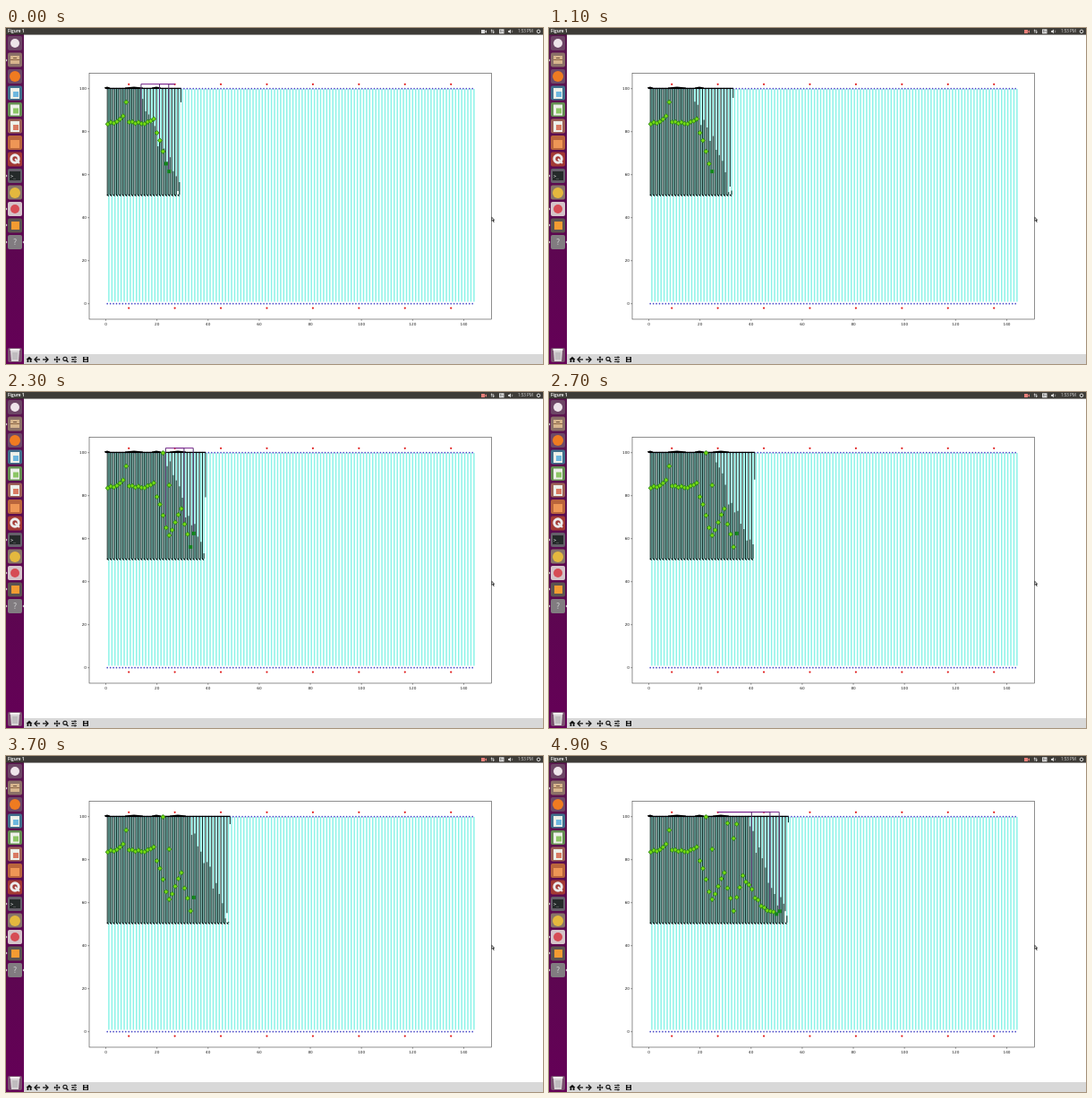
Animation, 600 px wide and 375 px high, one loop 5 s. Source, as an HTML page with a canvas:

```html
<!DOCTYPE html>
<html lang="en">
<head>
<meta charset="utf-8">
<title>Figure 1</title>
<style>
html, body { margin: 0; width: 100%; height: 100%; overflow: hidden; background: #fff; }
canvas { display: block; }
</style>
</head>
<body>
<canvas id="stage" width="600" height="375"></canvas>
<script>
const c = document.getElementById('stage').getContext('2d');
const LOOP = 5000, ROWS = 120, TOP = 68, MID = 187, BASE = 307.7, DEPOT = 62.6;
const px = v => 111.5 + v * 2.857, py = v => BASE - v * 2.4;
const rowX = k => px(.6 + 1.2 * k);
const clamp = v => Math.max(0, Math.min(1, v));
const mix = (a, b, u) => a + (b - a) * u;
const noise = k => {
  const s = Math.sin(k * 12.9898 + 4.1) * 43758.5453;
  return (s - Math.floor(s)) * 2 - 1;
};

// Straight runs between a few [position, value] points.
function ramp(points, at) {
  let i = 0;
  while (i < points.length - 2 && at >= points[i + 1][0]) i++;
  const [a, b] = [points[i], points[i + 1]];
  return mix(a[1], b[1], clamp((at - a[0]) / (b[0] - a[0])));
}

// How many rows are traced, and how many are picked, at time t.
const traced = t => ramp([[0, 24.15], [1100, 27.1], [3100, 36.1], [4200, 43.4], [5000, 45.3]], t);
const picked = t => ramp([[0, 20], [300, 20.9], [1300, 20.9], [2400, 28.9], [3900, 28.9], [5000, 43.5]], t);

// Height of the pick in row k.
const pickY = k => noise(k) * 3 + ramp([[0, 108], [5, 99], [6, 85], [7, 102], [11, 108], [15, 103],
  [20, 163], [24, 131], [27, 172], [30, 134], [36, 168], [42, 175]], k);

// Late picks higher up: row, height, time.
const extras = [[18, 68, 1500], [20, 104, 2000], [25, 75, 3800], [27, 92, 4000], [28, 76, 3900]];

function rect(x, y, w, h, color) {
  c.fillStyle = color;
  c.fillRect(x, y, w, h);
}
function line(color, width, ...pts) {
  c.strokeStyle = color;
  c.lineWidth = width;
  c.beginPath();
  for (let i = 0; i < pts.length; i += 2) c.lineTo(pts[i], pts[i + 1]);
  c.stroke();
}
function poly(color, ...pts) {
  c.fillStyle = color;
  c.beginPath();
  for (let i = 0; i < pts.length; i += 2) c.lineTo(pts[i], pts[i + 1]);
  c.fill();
}
function diamond(x, y, r, color) {
  poly(color, x - r, y, x, y - r, x + r, y, x, y + r);
}
function dot(x, y, r, color) {
  c.fillStyle = color;
  c.beginPath();
  c.arc(x, y, r, 0, 7);
  c.fill();
}
function ring(x, y, r, color, width) {
  c.strokeStyle = color;
  c.lineWidth = width;
  c.beginPath();
  c.arc(x, y, r, 0, 7);
  c.stroke();
}
function text(s, x, y, font, color, align = 'left') {
  c.font = font;
  c.fillStyle = color;
  c.textAlign = align;
  c.fillText(s, x, y);
}
function tile(y, color) {
  c.fillStyle = color;
  c.beginPath();
  c.roundRect(2, y - 8, 16, 16, 2);
  c.fill();
}

function drawSidebar() {
  const g = c.createLinearGradient(0, 7, 0, 375);
  g.addColorStop(0, '#5b1750');
  g.addColorStop(.6, '#5c0750');
  g.addColorStop(1, '#650057');
  rect(0, 7, 20, 368, g);
  const tiles = ['#6d4666', '#8b7168', '#6d4a68', '#41718d', '#648f52', '#9d6257', '#b9653c',
    '#a33a35', '#65606a', '#87756a', '#d4c4c9', '#5c5551', '#817c80'];
  tiles.forEach((color, i) => tile(17 + i * 18.5, color));
  dot(10, 17, 5, '#eee4ea');
  rect(5, 31, 10, 9, '#d7b58d');
  rect(5, 35, 10, 1, '#8c6545');
  rect(8, 33, 4, 1, '#72533d');
  dot(10, 54, 6, '#ef7b21');
  ['#6db7df', '#8cc665', '#d97a62'].forEach((color, i) => {
    rect(5, 67 + i * 18.5, 10, 12, '#edf0e9');
    rect(8, 71 + i * 18.5, 6, 6, color);
  });
  rect(5, 125, 10, 9, '#ee9656');
  ring(10, 146, 4.2, '#ececec', 3);
  line('#ececec', 2, 10, 146, 15, 151);
  rect(4, 160, 12, 10, '#252a2a');
  text('>_', 5, 167, '5px "DejaVu Sans Mono", monospace', '#fff');
  dot(10, 184, 6, '#e4b83e');
  dot(10, 202, 5, '#d64c55');
  rect(6, 216, 9, 9, '#f39b32');
  text('?', 10, 242, '8px "DejaVu Sans", sans-serif', '#ccc', 'center');
  for (const y of [36, 165, 202, 220, 239]) poly('#ddd', 0, y - 1.5, 1.5, y, 0, y + 1.5);
  poly('#ddd', 20, 237.5, 18.5, 239, 20, 240.5);
  tile(365, '#79516f');
  poly('#d8d4d6', 5, 360, 15, 360, 14, 372, 6, 372);
  rect(4.5, 358, 11, 2, '#f2eff0');
  for (const x of [8, 10, 12]) line('#8b858a', .6, x, 362, x, 370);
}

function drawBar(t) {
  rect(0, 0, 600, 7, '#3d3b37');
  rect(0, 7, 600, .5, '#26231f');
  text('Figure 1', 2, 5.4, 'bold 4.7px "Open Sans", sans-serif', '#eee');
  const rec = t < 100 ? '#ddd' : '#e9807a';
  rect(531, 2, 4, 4, rec);
  poly(rec, 535, 4, 537, 2.2, 537, 5.8);
  poly('#ddd', 541.5, 3.2, 542.7, 1.2, 543.9, 3.2);
  poly('#ddd', 543.5, 4.3, 544.7, 6.3, 545.9, 4.3);
  line('#ddd', .7, 542.7, 3, 542.7, 5.5);
  line('#ddd', .7, 544.7, 2, 544.7, 5);
  rect(551, 1.3, 5.5, 5, '#ddd');
  text('En', 553.7, 5.3, '3.5px "Open Sans", sans-serif', '#333', 'center');
  poly('#ddd', 561, 3, 562.2, 3, 564, 1.5, 564, 6, 562.2, 4.8, 561, 4.8);
  line('#ddd', .5, 565.2, 2.5, 565.8, 3.7, 565.2, 5);
  text('1:53 PM', 572, 5.4, '4.5px "Open Sans", sans-serif', '#ddd');
  ring(595, 3.8, 1.8, '#ddd', 1);
}

function drawTools() {
  rect(20, 364, 580, 11, '#d8d8d8');
  const k = '#111';
  poly(k, 22.5, 370, 26, 366.8, 29.5, 370);
  rect(23.5, 370, 1.8, 3, k);
  rect(26.7, 370, 1.8, 3, k);
  for (const [x, d] of [[35, 1], [44, -1]]) {
    line(k, 1.3, x - 3 * d, 370, x + 3 * d, 370);
    line(k, 1.3, x, 367, x - 3 * d, 370, x, 373);
  }
  line(k, 1, 54, 370, 60, 370);
  line(k, 1, 57, 367, 57, 373);
  for (const d of [-1, 1]) {
    poly(k, 57 + 3.7 * d, 370, 57 + 2 * d, 368.6, 57 + 2 * d, 371.4);
    poly(k, 57, 370 + 3.7 * d, 55.6, 370 + 2 * d, 58.4, 370 + 2 * d);
  }
  ring(66, 369.3, 2.1, k, 1.1);
  line(k, 1.3, 67.5, 371, 69.5, 373);
  [367.5, 370, 372.5].forEach((y, i) => {
    line(k, .8, 73, y, 79, y);
    rect(i % 2 ? 74.3 : 76.5, y - 1, 1.2, 2, k);
  });
  rect(86, 367, 6, 6, k);
  rect(87.5, 367.5, 3, 1.8, '#d8d8d8');
  rect(87.3, 370.6, 3.5, 1.6, '#d8d8d8');
}

function drawAxes() {
  const font = '4.2px "DejaVu Sans", sans-serif';
  for (let v = 0; v <= 140; v += 20) {
    line('#222', .5, px(v), 325, px(v), 326.7);
    text(v, px(v), 331.7, font, '#222', 'center');
  }
  for (let v = 0; v <= 100; v += 20) {
    line('#222', .5, 91.3, py(v), 93, py(v));
    text(v, 90, py(v) + 1.6, font, '#222', 'right');
  }
  for (let k = 0; k < ROWS; k++) {
    const x = rowX(k);
    line('#8bf3e8', 1.5, x + 1.7, TOP, x + 1.7, 305.5);
    for (const y of [67.7, BASE]) dot(x, y, .85, '#4c4cc8');
  }
  for (let v = 9; v < 144; v += 18) {
    for (const y of [62.8, 312.6]) dot(px(v), y, 1.1, '#e01818');
  }
}

function drawRows(t) {
  const head = traced(t);
  for (let k = 0; k < head; k++) {
    const x = rowX(k), done = clamp((head - k) / 1.2), age = head - 1 - k;
    line('#16302c', 1.05, x, TOP, x, mix(TOP, MID, done));
    if (done < .85) continue;
    const top = age > 13 ? TOP : Math.min(185, 181 - 8 * age + 12 * noise(k));
    line('#335f58', 1.4, x + 1.7, Math.max(TOP, top), x + 1.7, MID - 1);
    line('#000', 1.2, x - .2, 185.8, x + 1.4, 187.5);
  }
  const front = rowX(Math.floor(head));
  line('#000', 1.4, 111, 67.4, front, 67.4);
  // Uneven edge above the finished rows.
  for (const [x, reach] of [[113, 3], [143, 10], [168, 5], [192, 9]]) {
    if (x < front - 25) line('#000', 1.2, x - reach, 67, x, 66.2, x + reach, 67);
  }
}

function drawTrips(t) {
  if (picked(t + 50) === picked(t)) return;
  const station = px(27), last = Math.floor(picked(t));
  for (const back of [0, 3, 9]) {
    const x = rowX(last - back);
    line('#7a248f', 1, station, DEPOT, x, DEPOT);
    line('#55306b', 1, x, DEPOT, x, pickY(last - back));
  }
}

function drawPick(k, y, fresh) {
  const x = rowX(k) + .5;
  if (fresh) return rect(x - 2, y - 2, 4, 4, '#12851a');
  diamond(x, y, 3, '#2d8a12');
  diamond(x, y, 2, '#78dc16');
}

function drawPicks(t) {
  const count = picked(t);
  for (let k = 0; k <= count; k++) drawPick(k, pickY(k), k > count - 1.5);
  for (const [k, y, start] of extras) if (t >= start) drawPick(k, y, t < start + 100);
}

function draw(t) {
  rect(0, 0, 600, 375, '#fff');
  drawAxes();
  drawRows(t);
  drawTrips(t);
  drawPicks(t);
  c.strokeStyle = '#444';
  c.lineWidth = .6;
  c.strokeRect(93, 50.5, 449.5, 274.5);
  poly('#222', 542.5, 210.5, 542.5, 216, 543.8, 215, 544.8, 217, 545.7, 216.5, 544.8, 214.7, 546.3, 214.5);
  poly('#fff', 543.1, 212, 543.1, 214.6, 544.8, 213.9);
  drawSidebar();
  drawTools();
  drawBar(t);
}

const begin = performance.now();
function tick(now) {
  const t = Math.max(0, now - begin) % LOOP;
  draw(Math.floor(t / 100) * 100);
  requestAnimationFrame(tick);
}
draw(0);
requestAnimationFrame(tick);
</script>
</body>
</html>
```
